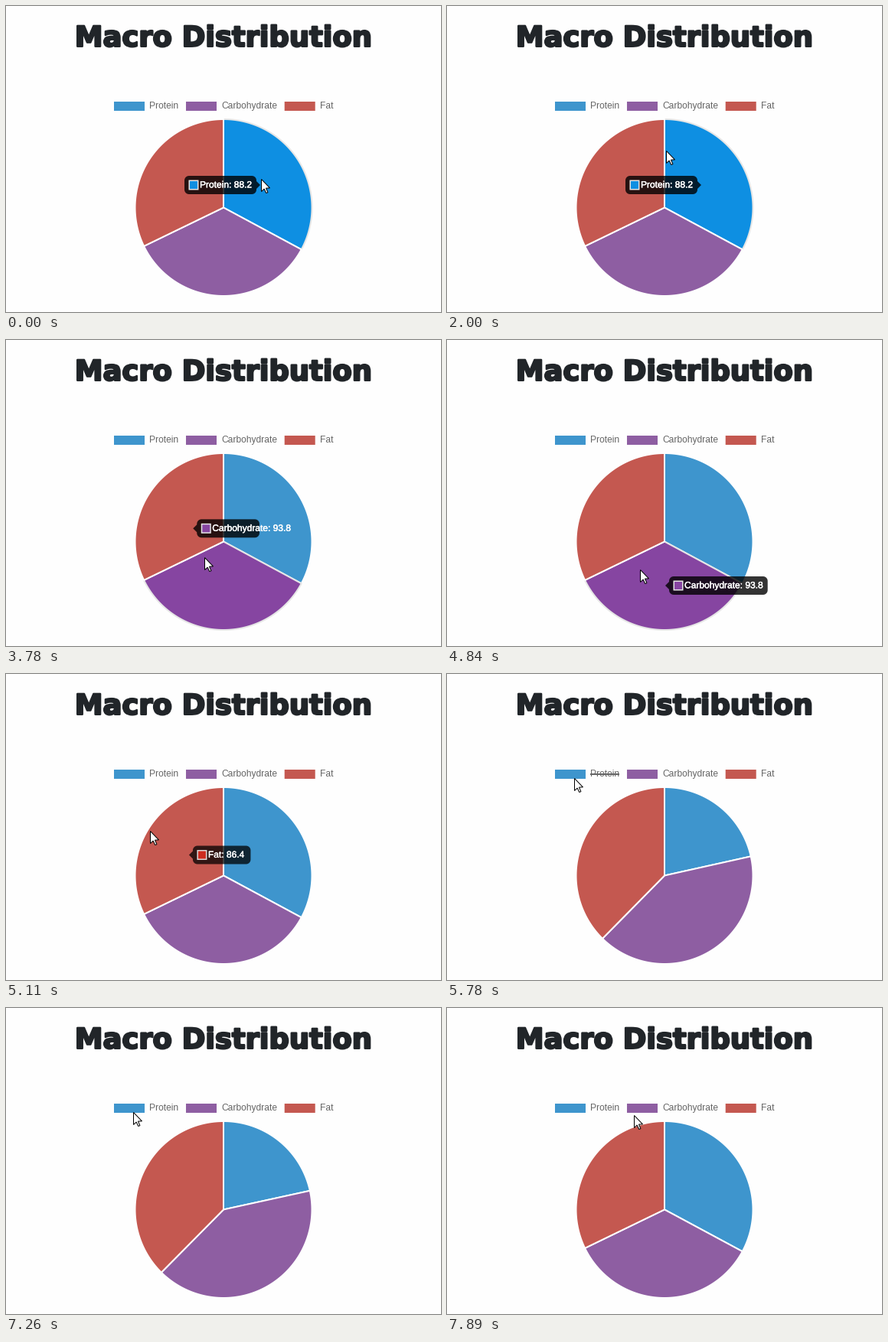
A matplotlib script that plays this animation: 568 px wide and 400 px high, repeating every 8 s.

```python
import colorsys

import numpy as np
import matplotlib.pyplot as plt
from matplotlib.animation import FuncAnimation
from matplotlib.colors import to_rgb
from matplotlib.patches import Polygon, Rectangle
from matplotlib.patheffects import withStroke

W, H, DPI = 568, 400, 64
PX = 72 / DPI                       # points per pixel
LOOP, STEP = 8000, 20
TICK, LEAD = 134, 20                # the picture is redrawn once per tick (ms)
INK, GREY, HOVER_EDGE = "#212529", "#666666", "#e6e6e6"

CENTRE, RADIUS = np.array([284, 263.5]), 115.5
NAMES = ["Protein", "Carbohydrate", "Fat"]
VALUES = np.array([88.2, 93.8, 86.4])
COLORS = ["#3e95cd", "#8e5ea2", "#c45850"]
NAME_WIDTHS = np.array([38, 72.7, 17.3])
TIP_WIDTHS = NAME_WIDTHS + 56       # padding, swatch and number
LEGEND_X = 141 + np.cumsum([0, *NAME_WIDTHS[:-1] + 56])

# Pointer moves in ticks: start, end, target x, target y; it rests in between
POINTER_START = (333, 226)
MOVES = [(0, 2, 297, 218), (4, 8, 339, 219), (10, 15, 286, 189),
         (15, 18, 235, 207), (24, 28, 259, 284), (28, 31, 283, 338),
         (33, 36, 252, 300), (36, 39, 156, 158), (39, 41, 166, 136),
         (55, 59, 244, 140)]
ARROW = np.array([(0, 0), (0, 16), (3.7, 12.6), (6.2, 18), (8.4, 17.2),
                  (6, 11.6), (11, 11.4)]) + 0.5

# Chart events in ticks
HOVERS = [(-9, 0), (15.3, 2), (27.88, 1), (36.35, 2)]    # start, slice
LEAVE, HIDE, SHOW = 37.95, 42.25, 52.25


def progress(tick, start, duration):
    """Quartic ease-out since a start tick; duration in ms."""
    p = np.clip((tick - start) * TICK / duration, 0, 1)
    return 1 - (1 - p) ** 4


def hover_color(color):
    """More saturated and darker, as the chart does on hover."""
    h, l, s = colorsys.rgb_to_hls(*to_rgb(color))
    return colorsys.hls_to_rgb(h, l * 0.9, s * 1.5)


def on_circle(angle, radius):
    """Points at angles in degrees, clockwise from the top."""
    a = np.radians(angle)
    return CENTRE + radius * np.column_stack([np.sin(a), -np.cos(a)])


def pointer(tick):
    spot = np.array(POINTER_START, float)
    for start, end, x, y in MOVES:
        p = np.clip((tick - start) / (end - start), 0, 1)
        spot += (np.array([x, y]) - spot) * p
    return np.round(spot)


def tip_target(k):
    """Left edge, middle height and width of the tooltip for slice k."""
    middle = (VALUES[:k].sum() + VALUES[k] / 2) / VALUES.sum() * 360
    x, y = np.round(on_circle([middle], RADIUS / 2)[0])
    w = TIP_WIDTHS[k]
    return np.array([x - 7 - w if k == 0 else x + 7, y, w])


def tip_outline(x, y, w, caret_right):
    """Rounded box with a small caret on one side."""
    r, half = 6, 12
    parts = []
    for corner in range(4):
        cx = x + w - r if corner < 2 else x + r
        cy = y + half - r if corner in (1, 2) else y - half + r
        a = np.radians(np.linspace(-90, 0, 8) + 90 * corner)
        parts.append(np.column_stack([cx + r * np.cos(a), cy + r * np.sin(a)]))
    if caret_right:
        parts.insert(1, [(x + w, y - 5), (x + w + 5, y), (x + w, y + 5)])
    else:
        parts.insert(3, [(x, y + 5), (x - 5, y), (x, y - 5)])
    return np.vstack(parts)


def label(x, y, text, color, size=12, stroke=0, **style):
    item = ax.text(x, y, text, color=color, fontsize=size * PX, va="baseline",
                   **style)
    if stroke:
        item.set_path_effects([withStroke(linewidth=stroke * PX,
                                          foreground=color, joinstyle="round")])
    return item


fig = plt.figure(figsize=(W / DPI, H / DPI), dpi=DPI, facecolor="#fefefe")
ax = fig.add_axes([0, 0, 1, 1])
ax.axis("off")

label(89.8, 52.8, "Macro Distribution", INK, size=36.9, stroke=2.4,
      family="DejaVu Sans", weight="bold")
for name, color, x in zip(NAMES, COLORS, LEGEND_X):
    ax.add_patch(Rectangle((x, 125), 40, 12, fc=color, lw=0, snap=False))
    label(x + 46, 134.3, name, GREY, family="Liberation Sans")
strike, = ax.plot([187, 225], [131, 131], color=GREY, lw=2 * PX,
                  solid_capstyle="butt", zorder=3)

slices = [ax.add_patch(Polygon([(0, 0), (1, 1)], lw=2 * PX, zorder=4 + k,
                               joinstyle="round")) for k in range(3)]
tip = ax.add_patch(Polygon([(0, 0), (1, 1)], fc="black", lw=0, zorder=8))
swatch = ax.add_patch(Rectangle((0, 0), 11.5, 11.5, ec=HOVER_EDGE,
                                lw=1.5 * PX, snap=False, zorder=9))
tip_text = label(0, 0, "", "white", stroke=0.4, family="Liberation Sans",
                 zorder=9)
arrow = ax.add_patch(Polygon(ARROW, fc="white", ec="black", lw=PX, zorder=10,
                             joinstyle="miter"))
ax.set_xlim(0, W)
ax.set_ylim(H, 0)


def draw_pie(tick, hovered):
    hidden = progress(tick, HIDE, 1000) - progress(tick, SHOW, 1000)
    rest = VALUES * [0, 1, 1]
    shares = (1 - hidden) * VALUES / VALUES.sum() + hidden * rest / rest.sum()
    ends = np.concatenate([[0], np.cumsum(shares) * 360])
    for k, piece in enumerate(slices):
        rim = on_circle(np.linspace(ends[k], ends[k + 1], 90), RADIUS)
        piece.set_xy(np.vstack([CENTRE, rim]))
        lit = k == hovered
        piece.set_facecolor(hover_color(COLORS[k]) if lit else COLORS[k])
        piece.set_edgecolor(HOVER_EDGE if lit else "white")
        piece.set_visible(shares[k] > 1e-4)
    strike.set_visible(HIDE <= tick < SHOW)


def draw_tip(tick, index):
    start, k = HOVERS[index]
    old = tip_target(HOVERS[max(index - 1, 0)][1])
    x, y, w = old + (tip_target(k) - old) * progress(tick, start, 400)
    alpha = 1 - progress(tick, LEAVE, 400)
    tip.set_xy(tip_outline(x, y, w, k == 0))
    tip.set_alpha(0.8 * alpha)
    swatch.set_xy((x + 6.25, y - 5.75))
    swatch.set_facecolor(hover_color(COLORS[k]))
    swatch.set_alpha(alpha)
    tip_text.set_position((x + 20, y + 3.4))
    tip_text.set_text(f"{NAMES[k]}: {VALUES[k]}")
    tip_text.set_alpha(alpha)
    for part in (tip, swatch, tip_text):
        part.set_visible(alpha > 0.01)


def update(i):
    tick = int((i * STEP + STEP / 2 + LEAD) / TICK)
    index = sum(start <= tick for start, _ in HOVERS) - 1
    draw_pie(tick, HOVERS[index][1] if tick < LEAVE else None)
    draw_tip(tick, index)
    arrow.set_xy(ARROW + pointer(tick))
    return []


anim = FuncAnimation(fig, update, frames=LOOP // STEP, interval=STEP,
                     init_func=lambda: [], repeat=True, repeat_delay=0)
plt.show()
```
